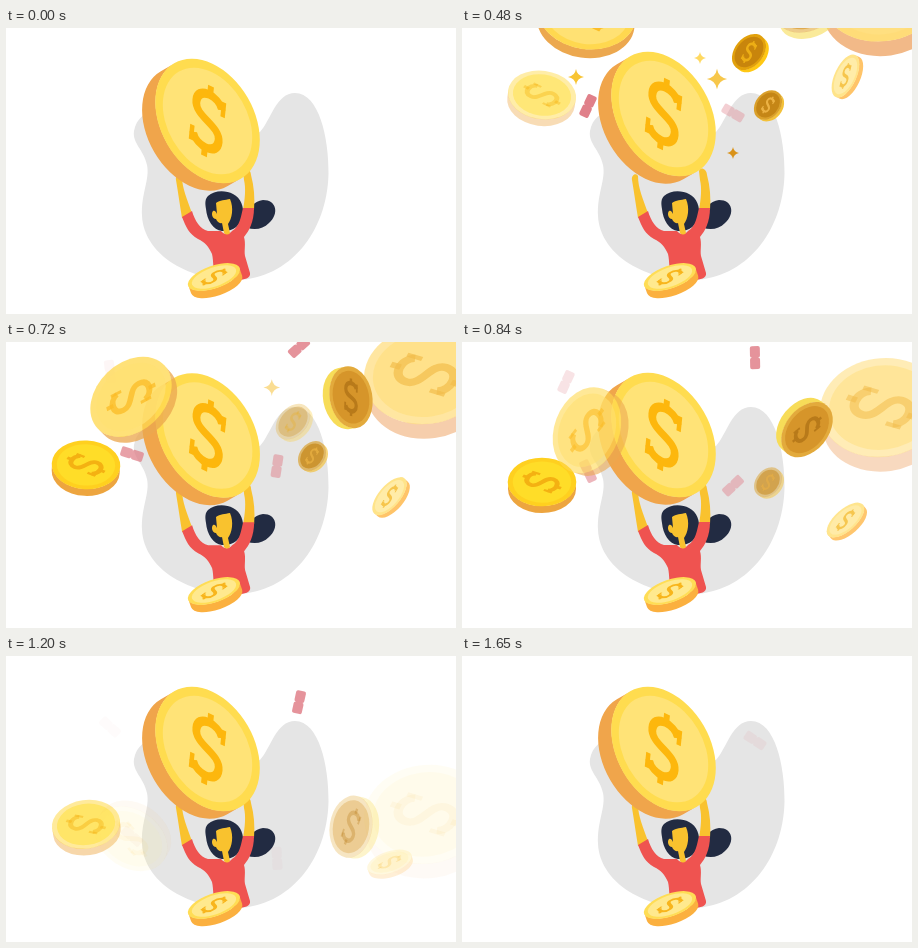
An HTML page with a canvas for the animation above (1800 ms loop, 450 by 286 pixels).

```html
<!DOCTYPE html>
<html lang="en">
<head>
<meta charset="utf-8">
<title>Coin rain</title>
<style>
html, body { margin: 0; width: 100%; height: 100%; overflow: hidden; background: #fff; }
canvas { display: block; }
</style>
</head>
<body>
<canvas id="stage" width="450" height="286"></canvas>
<script>
const ctx = document.getElementById('stage').getContext('2d');
const LOOP = 1800, STEP = 30, START = 120, LAST = 1650;
const BURST = 480; // all particle positions, angles and speeds refer to this moment
const TAU = 2 * Math.PI, RAD = Math.PI / 180;

const ramp = (t, [from, to]) => Math.min(1, Math.max(0, (t - from) / (to - from)));
const opacity = (t, { show, hide, peak = 1 }) => peak * ramp(t, show) * (1 - ramp(t, hide));

function at(x, y, deg, alpha, draw) {
  if (alpha <= 0) return;
  ctx.save();
  ctx.globalAlpha *= alpha;
  ctx.translate(x, y);
  ctx.rotate(deg * RAD);
  draw();
  ctx.restore();
}

function shape(color, d) {
  ctx.fillStyle = color;
  ctx.fill(new Path2D(d));
}

function disc(color, a, b) {
  ctx.fillStyle = color;
  ctx.beginPath();
  ctx.ellipse(0, 0, a, b, 0, 0, TAU);
  ctx.fill();
}

const curl = new Path2D('M13,-16C9,-28 -13,-28 -13,-13C-13,1 13,-1 13,13C13,28 -9,28 -13,16');
const bars = new Path2D('M0,-33V-24M0,24V33');
const serifs = new Path2D('M14.5,-24V-10M-14.5,10V24');

function dollar(color) {
  ctx.strokeStyle = color;
  for (const [path, width] of [[curl, 8], [bars, 6], [serifs, 4.5]]) {
    ctx.lineWidth = width;
    ctx.stroke(path);
  }
}

// The edge is the swept outline minus the face, so faded coins stay even.
function coin(x, y, deg, alpha, { a, b, depth, turn, colors }) {
  const [edge, face, inner, sign] = colors;
  at(x, y, deg, alpha, () => {
    ctx.fillStyle = edge;
    ctx.beginPath();
    ctx.ellipse(0, 0, a, b, 0, Math.PI, TAU);
    ctx.ellipse(0, depth, a, b, 0, 0, Math.PI);
    ctx.closePath();
    ctx.moveTo(a, 0);
    ctx.ellipse(0, 0, a, b, 0, 0, TAU);
    ctx.fill('evenodd');
    disc(face, a + 0.3, b + 0.3);
    disc(inner, a * 0.86, b * 0.86);
    ctx.scale(a, b);
    ctx.rotate(turn * RAD);
    ctx.scale(0.0187, 0.0187);
    dollar(sign);
  });
}

const heldCoin = { a: 66.4, b: 46.2, depth: 15.5, turn: -44,
  colors: ['#f0a54b', '#ffdc4f', '#ffe377', '#fdb70d'] };
const restingCoin = { a: 27, b: 11, depth: 8, turn: 52,
  colors: ['#fbb03f', '#ffdd55', '#ffe98e', '#f8b51c'] };

// speed in px/s; drag is the time constant in seconds, negative to accelerate;
// spin in degrees/s; show and hide are the fade intervals in ms.
const coins = [
  { x: 420, y: -36, speed: 295, drag: 4, deg: -8, spin: 0, show: [270, 300], hide: [480, 1260],
    a: 62, b: 49, depth: 15, turn: -60, colors: ['#f2b988', '#ffdc78', '#ffdf80', '#f3bd4c'] },
  { x: 80, y: 67, speed: 314, drag: 0.38, deg: 8, spin: -22, show: [330, 720], hide: [900, 1440],
    a: 34, b: 24, depth: 7, turn: -65, colors: ['#eda53f', '#ffd01f', '#ffdd28', '#f4b112'] },
  { x: 125, y: -15, speed: 300, drag: 4, deg: 8, spin: -215, show: [270, 300], hide: [560, 1240],
    a: 49, b: 36, depth: 9, turn: 112, shrink: 0.28, colors: ['#eca84f', '#ffd84f', '#ffe173', '#fbbd28'] },
  { x: 287, y: 24, speed: 235, drag: 9, deg: -50, spin: 10, show: [270, 300], hide: [500, 800],
    a: 20, b: 14, depth: 4, turn: 70, colors: ['#ffc814', '#e2a10c', '#c8850c', '#edae15'] },
  { x: 345, y: -18, speed: 330, drag: 1.5, deg: -20, spin: 415, show: [300, 600], hide: [1000, 1290],
    a: 31, b: 21, depth: 7, turn: -75, colors: ['#f7dc58', '#e3aa3c', '#d6952a', '#b87a1a'] },
  { x: 306, y: 77, speed: 120, drag: -0.5, deg: -50, spin: -5, show: [360, 450], hide: [480, 1200],
    a: 16, b: 12, depth: 3, turn: 80, colors: ['#f3c13a', '#daa02b', '#c58616', '#ecb244'] },
  { x: 383.5, y: 48, speed: 706, drag: 0.235, deg: -65, spin: 65, show: [300, 330], hide: [820, 1340],
    a: 23, b: 10.5, depth: 4.5, turn: 65, colors: ['#ffc469', '#ffe48a', '#ffeca8', '#f6c54c'] }
];

const confetti = [
  { x: 126, y: 78, speed: 142, deg: -65, spin: 320, show: [360, 450], hide: [540, 1240] },
  { x: 271, y: 85, speed: 163, deg: 30, spin: 265, show: [360, 520], hide: [800, 1250], peak: 0.5 },
  { x: 293, y: -15, speed: 85, deg: 46, spin: -340, show: [450, 480], hide: [1300, 1700], peak: 0.85 },
  { x: 104, y: 9, speed: 86, deg: -154, spin: 220, show: [660, 840], hide: [900, 1250], peak: 0.22 }
];

const stars = [
  { color: '#f8c431', x: 114, y: 49, r: 8, life: [330, 610] },
  { color: '#ffd960', x: 238, y: 30, r: 6, life: [330, 650], drift: 20 },
  { color: '#f5bc2a', x: 255, y: 51, r: 11, life: [330, 800], drift: 45 },
  { color: '#d99219', x: 271, y: 125, r: 6, life: [360, 600] }
];

function fallingCoin(t, c) {
  const s = (t - BURST) / 1000;
  const size = 1 - (c.shrink || 0) * Math.max(0, s);
  const y = c.y + c.speed * c.drag * (1 - Math.exp(-s / c.drag));
  const sized = { ...c, a: c.a * size, b: c.b * size, depth: c.depth * size };
  coin(c.x, y, c.deg + c.spin * s, opacity(t, c), sized);
}

// Paper strips fall evenly and spin up as they go.
function paper(t, p) {
  const s = (t - BURST) / 1000;
  at(p.x, p.y + p.speed * s, p.deg + p.spin * (s + s * s / 3), opacity(t, p), () => {
    ctx.fillStyle = '#e0808a';
    ctx.beginPath();
    ctx.roundRect(-11.5, -5, 11.5, 10, 2);
    ctx.roundRect(0, -5, 11.5, 10, 2);
    ctx.fill();
  });
}

function star(t, { color, x, y, r, life, drift = 0 }) {
  const glow = Math.sin(Math.PI * ramp(t, life));
  const shift = drift * (t - BURST) / 1000;
  at(x + shift, y - shift / 2, 0, glow, () => {
    const size = r * (0.5 + 0.5 * glow);
    ctx.fillStyle = color;
    ctx.beginPath();
    ctx.moveTo(size, 0);
    for (let i = 1; i <= 4; i++) {
      const tip = i * TAU / 4, notch = tip - TAU / 8;
      ctx.quadraticCurveTo(size * 0.2 * Math.cos(notch), size * 0.2 * Math.sin(notch),
        size * Math.cos(tip), size * Math.sin(tip));
    }
    ctx.fill();
  });
}

function woman(lean) {
  const skin = '#f9c22e', hair = '#222b42';
  shape(hair, 'M232,180C241,190 246,173 258,172C272,172 274,186 264,195C256,203 244,203 234,195Z');
  at(lean, lean, 0, 1, () => {
    shape(skin, 'M171,152C170,147 175,144 177,148C177,160 182,171 187,185L177,190C175,178 173,164 171,152Z');
    shape(skin, 'M238,143C239,138 246,141 246,147C249,158 250,170 249,182L238,182C240,171 241,160 239,152Z');
  });
  shape(hair, 'M203,168C209,162 221,162 228,166C236,170 239,179 238,187C236,198 227,204 217,203C208,202 202,192 201,181C200,175 200,171 203,168Z');
  at(lean, lean, 0, 1, () => {
    shape('#ef5350', 'M177,189L187,183C190,193 195,201 203,203L216,203C219,207 224,207 227,203C235,198 236,188 238,180L249,180C249,194 244,203 239,209C241,216 239,222 240,228L245,245C246,250 239,252 233,252L212,249C207,242 209,234 207,226C204,219 200,214 193,211C184,206 181,199 177,189Z');
  });
  shape(skin, 'M211,175C215,172 220,172 225,171C229,180 227,191 223,196L225,205Q222,208 219,205L217,195C214,196 212,193 211,191C207,191 206,185 208,183C210,182 211,184 212,186Z');
}

// A fading swing: dip, throw, catch.
function tossDrop(t) {
  if (t < 150 || t > 727) return 0;
  return Math.min(9, 0.02 * (930 - t)) * Math.sin(TAU * (t - 150) / 385);
}

function render(t) {
  ctx.fillStyle = '#fff';
  ctx.fillRect(0, 0, 450, 286);
  shape('#e5e5e5', 'M289,65C313,65 323,110 322.5,146C321,205 283,250 232,252C180,253 138,225 136,188C135,165 144,152 141,137C138,122 126,115 128,103C131,88 142,83 152,85L200,110L254,104C265,92 270,65 289,65Z');

  const drop = tossDrop(t), dip = Math.max(0, drop);
  at(-1, 0, 0, 1, () => {
    woman(dip / 4);
    coin(202.5 + dip / 3, 93 + drop, 60, 1, heldCoin);
    coin(209, 249, -19, 1, restingCoin);
  });
  confetti.forEach(p => paper(t, p));
  coins.forEach(c => fallingCoin(t, c));
  stars.forEach(s => star(t, s));
}

function tick(now) {
  const t = Math.floor((now % LOOP) / STEP) * STEP;
  render(t < START ? 0 : Math.min(t, LAST));
  requestAnimationFrame(tick);
}
requestAnimationFrame(tick);
</script>
</body>
</html>
```
